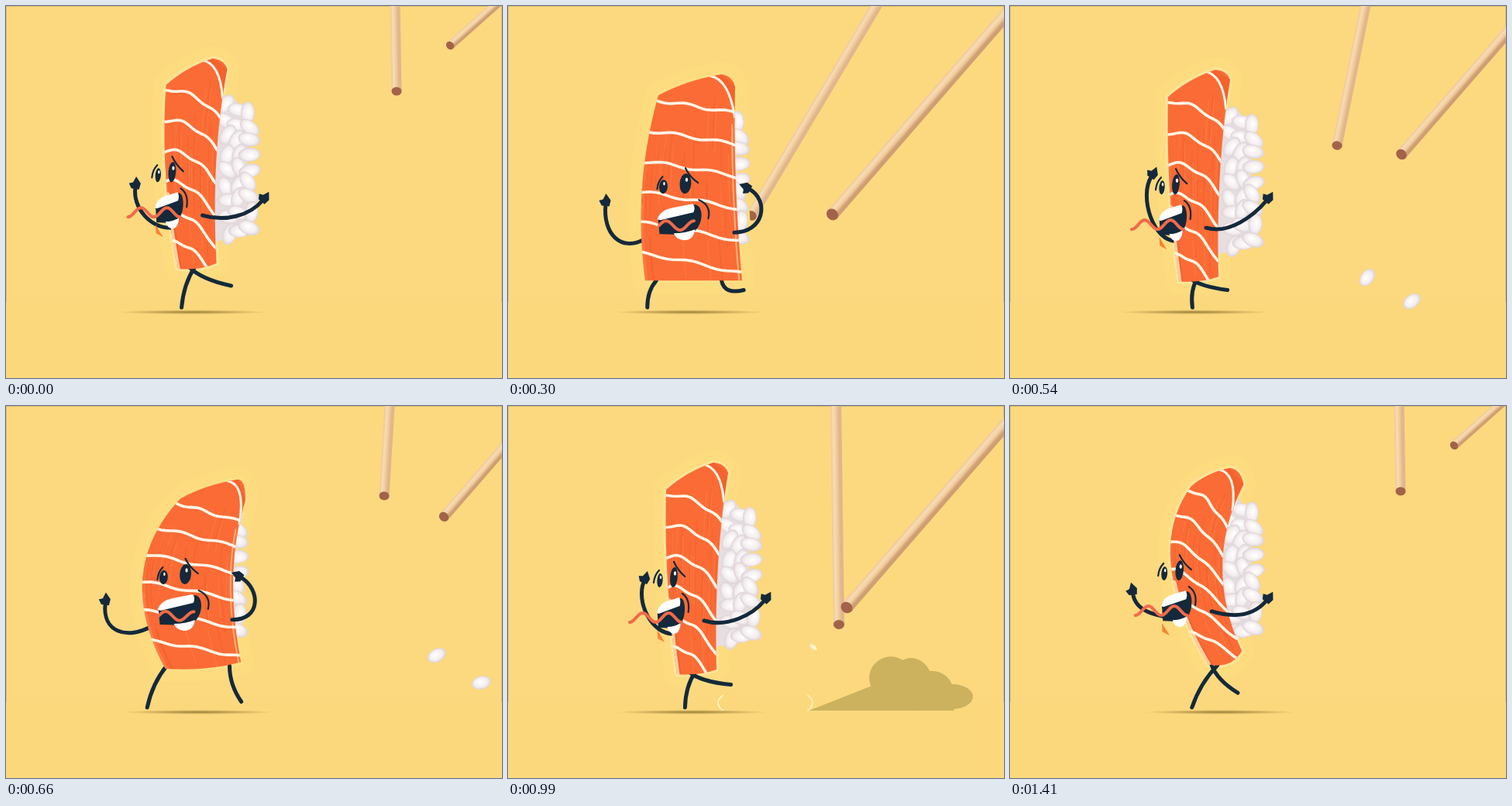
An HTML page with a canvas that plays this animation: 640 px wide and 480 px high, repeating every 1440 ms.

```html
<!DOCTYPE html>
<html lang="en">
<head>
<meta charset="utf-8">
<title>Runaway sushi</title>
<style>
  html, body { margin: 0; width: 100%; height: 100%; overflow: hidden; background: #fcd97e; }
  canvas { display: block; width: 640px; height: 480px; }
</style>
</head>
<body>
<canvas id="stage" width="640" height="480"></canvas>
<script>
const ctx = document.getElementById('stage').getContext('2d');
const LOOP = 1440, STEP = 30, STRIDE = 480, HITS = [840, 1200];
const NAVY = '#14293b', CREAM = '#fff6e6', SALMON = '#fa6b35', TAU = Math.PI * 2;

// Chopstick moments: back tip x, y, back tilt in degrees, front tip x, y.
const REST = [504,110,-1, 573,51], STAB = [340,385,12.9, 350,366];
const moments = [
  [0, ...REST], [180, 272,297,42, 392,298], [420, 356,244,19.6, 445,240], [660, 488,116,3.5, 565,143],
  [840, ...STAB], [990, 427,282,-.8, 437,260], [1220, ...STAB], [1410, ...REST], [LOOP, ...REST]
];

const mix = (a, b, k) => a + (b - a) * k;
const clamp = v => Math.max(0, Math.min(1, v));
const wave = (t, peak, period) => Math.cos(TAU * (t - peak) / period);
const noise = i => { const s = Math.sin(i * 91.7) * 4375.5; return s - Math.floor(s); };

// Eased values between neighbouring moments.
function sample(keys, t) {
  const i = keys.findIndex(key => key[0] > t), a = keys[i - 1], b = keys[i];
  const k = (t - a[0]) / (b[0] - a[0]);
  return a.slice(1).map((v, j) => mix(v, b[j + 1], k * k * (3 - 2 * k)));
}

// Parabola through three points at v = 0, .5 and 1.
function along([a, b, c], v) {
  const wa = (1 - v) * (1 - 2 * v), wb = 4 * v * (1 - v), wc = v * (2 * v - 1);
  return [0, 1].map(i => wa * a[i] + wb * b[i] + wc * c[i]);
}

function trace(f, steps = 20) {
  for (let i = 0; i <= steps; i++) ctx.lineTo(...f(i / steps));
}

function stroke(color, width) {
  ctx.strokeStyle = color;
  ctx.lineWidth = width;
  ctx.stroke();
}

function fill(color) {
  ctx.fillStyle = color;
  ctx.fill();
}

function polygon(list, color) {
  ctx.beginPath();
  for (let i = 0; i < list.length; i += 2) ctx.lineTo(list[i], list[i + 1]);
  ctx.closePath();
  fill(color);
}

function ellipse(x, y, rx, ry, color, turn = 0) {
  ctx.beginPath();
  ctx.ellipse(x, y, rx, ry, turn, 0, TAU);
  fill(color);
}

function local(x, y, turn, draw) {
  ctx.save();
  ctx.translate(x, y);
  ctx.rotate(turn);
  draw();
  ctx.restore();
}

function curve(x, y, ...rest) {
  ctx.beginPath();
  ctx.moveTo(x, y);
  rest.length > 4 ? ctx.bezierCurveTo(...rest) : ctx.quadraticCurveTo(...rest);
}

function shade(gradient, ...colors) {
  colors.forEach((c, i) => gradient.addColorStop(i / (colors.length - 1), c));
  return gradient;
}

// Every pose follows from how far the body is turned, bent and lifted.
function poseAt(t) {
  const phase = t % STRIDE;
  const side = clamp(.5 + .7 * wave(phase, 5, STRIDE));
  const bend = clamp(.5 + .95 * wave(phase, 162, 240));
  const lift = 4.6 - 12 * wave(phase, 225, 240);
  const blend = (base, turned = 0, bent = 0, both = 0) => base + turned * side + bent * bend + both * side * bend;
  const at = (x, y) => [blend(...x), blend(...y) + lift];
  const left = [
    at([194, 10, 30, 7], [106, 2, 14, -11]),
    at([173, 33, 2], [225, 3, -3, -18]),
    at([177, 41, 26, 21], [345, 1, -6, -2])
  ];
  const right = [
    at([293, -9, 16, 6], [95, -9, 27]),
    at([294, -23, 0, 4], [218, -11, 2, 6]),
    at([302, -33, 1, 37], [345, -5, -14, -8])
  ];
  const peak = at([275, -10, 25, -2], [79, -6, 16, 1]);
  return { phase, side, bend, lift, blend, at, left, right, peak };
}

function background() {
  ctx.fillStyle = '#fcd97e';
  ctx.fillRect(0, 0, 640, 480);
  ctx.fillStyle = 'rgba(240,200,100,.08)';
  ctx.fillRect(0, 382, 640, 98);
  ctx.fillStyle = '#dcbc70';
  ctx.fillRect(0, 0, 640, 1);
  ctx.fillRect(0, 0, 1, 382);
  ctx.fillRect(639, 0, 1, 382);
}

function groundShadow(x) {
  local(x, 395, 0, () => {
    ctx.scale(1, .03);
    ellipse(0, 0, 98, 98, shade(ctx.createRadialGradient(0, 0, 0, 0, 0, 98),
      'rgba(112,88,30,.7)', 'rgba(130,102,38,.4)', 'rgba(150,120,50,0)'));
  });
}

function impact(age) {
  if (age < 0 || age > 190) return;
  const grow = clamp((age - 30) / 120), dust = '#ccb25f';
  ctx.save();
  ctx.beginPath();
  ctx.rect(0, 0, 640, 393);
  ctx.clip();
  polygon([386, 394, 432 + 40 * grow, 370 - 10 * grow, 540 + 30 * grow, 372, 552 + 24 * grow, 394], dust);
  for (let i = 0; i < 4; i++) {
    ellipse(440 + 34 * i + grow * (54 - 8 * i), 381 - grow * (30 - 8 * i),
      25 + 3 * grow, 18 + 9 * Math.sin(i * 1.4 + .3) + 7 * grow, dust);
  }
  ctx.restore();
  const half = mix(1.05, .45, grow);
  for (const center of [0, Math.PI]) {
    ctx.beginPath();
    ctx.ellipse(332, 383, 61, 22, 0, center - half, center + half);
    stroke('#fff3bd', mix(3.5, 1.8, grow));
  }
  ellipse(mix(399, 394, grow), mix(346, 311, grow), 2.5, 5.5, '#fff6d2', mix(.6, -.9, grow));
}

function stick(x, y, tilt, w, length, dark) {
  local(x, y, tilt * Math.PI / 180, () => {
    const wood = shade(ctx.createLinearGradient(-w / 2, 0, w / 2, 0), '#eec89a', '#f8dcb2', '#f0cc9e', dark, dark);
    polygon([-w / 2, 0, -w / 2, -length + 4, 0, -length - 3, w / 2, -length + 5, w / 2, 0], wood);
    ellipse(0, 0, w / 2, w * .43, '#a2634a');
  });
}

function chopsticks(t) {
  const [bx, by, tilt, fx, fy] = sample(moments, t);
  stick(bx, by, tilt, 13 + 4 * (by / 385) ** 4, 381, '#e0b78c');
  stick(fx, fy, 41 + Math.max(0, 100 - fy) * .15, 10 + fy * .023, 520, '#cf9f73');
}

function grain(x, y, turn, rx, ry) {
  local(x, y, turn, () => {
    ctx.scale(rx, ry);
    ellipse(0, 0, 1, 1, shade(ctx.createRadialGradient(-.15, -.2, .1, 0, 0, 1), '#fffdfd', '#f9f5f5', '#f3edef', '#dcd2d6'));
  });
}

// A loose grain drifts right while its bounces die down.
function flyingGrain(age, height, rate) {
  if (age < 0) return;
  const size = clamp((age - 60) / 80);
  const y = 385 - height * Math.exp(-age / 270) * Math.abs(Math.cos(age * rate));
  grain(310 + .79 * age, y, (.21 * age - 95) * Math.PI / 180, 12.5 * size, 8.5 * size);
}

function rice({ side, lift }) {
  local(-16 * (1 - side), 4 + 4 * side + lift, 0, () => {
    polygon([268, 112, 296, 120, 312, 140, 310, 275, 292, 298, 264, 304], '#e6dee1');
    for (let i = 0; i < 27; i++) {
      const row = Math.floor(i / 3), col = i % 3;
      grain(283 + 14 * col + 4 * noise(i) + (row > 6 ? 2 : 0), 122 + 21 * row + 5 * col * (1 - row / 4) + 6 * noise(i + 9),
        noise(i + 40) * Math.PI, 14.5, 9);
    }
  });
}

function arm(x, y, c1x, c1y, c2x, c2y, hx, hy) {
  curve(x, y, c1x, c1y, c2x, c2y, hx, hy);
  stroke(NAVY, 5);
  local(hx, hy, Math.atan2(hy - c2y, hx - c2x), () => polygon([-2, -5, 4, -9, 6, -4, 14, -1, 6, 6, -2, 5], NAVY));
}

function leftArm({ phase, side, left }) {
  const [x, y] = along(left, .77), swing = Math.sin(TAU * phase / STRIDE);
  const hx = mix(126, 167 + 22 * swing, side), hy = mix(256, 234 - 20 * swing, side);
  arm(x + 4, y + 2, x - 26, y + 19 - 15 * side, hx - 18 * swing * side - 4, hy + 38 - 12 * side, hx, hy);
}

function rightArm({ side, blend, at }) {
  const [x, y] = at([292, -39, 1, 8], [283, -6, -7]);
  const hx = blend(311, 20, -9, 9), hy = blend(236, 15, -16, 16);
  arm(x, y, x + 38 - 8 * side, y + 9 * side, hx + 27 - 43 * side, hy + 15 + 4 * side, hx, hy);
}

// Both legs follow one rule, half a stride apart.
function leg({ phase, side, bend, left, right, blend }, sign) {
  const shift = sign > 0 ? 0 : STRIDE / 2, raise = Math.max(0, wave(phase + shift, 260, STRIDE)) ** 2;
  const hx = (left[2][0] + right[2][0]) / 2 - 6 - 9 * side * bend + sign * (42 - 38 * side);
  const hy = (left[2][1] + right[2][1]) / 2 + 12 * side * bend;
  const fx = blend(242, 16, 0, 8) - sign * wave(phase, 0, STRIDE) * (88 - 56 * side), fy = 389 - 30 * raise;
  curve(hx, hy, (hx + fx) / 2 - 6 - 6 * raise, (hy + fy) / 2 - 4 + 22 * raise * (1 - .6 * side), fx, fy);
  stroke(NAVY, 5);
}

function outline({ left, right, peak }) {
  const [bl, br] = [left[2], right[2]], sag = Math.max(0, bl[1] - br[1]);
  ctx.beginPath();
  trace(v => along(left, v));
  ctx.quadraticCurveTo((bl[0] + br[0]) / 2 + sag * .5, (bl[1] + br[1]) / 2 + sag * .9, ...br);
  trace(v => along(right, 1 - v));
  ctx.quadraticCurveTo((peak[0] + right[0][0]) / 2 + 5, peak[1] + 1, ...peak);
  ctx.quadraticCurveTo(mix(peak[0], left[0][0], .5) - 4, mix(peak[1], left[0][1], .5) - 6, ...left[0]);
  ctx.closePath();
}

function fish(pose) {
  const { left, right, peak, side } = pose;
  const inside = (u, v) => {
    const a = along(left, v), b = along(right, v);
    return [mix(a[0], b[0], u), mix(a[1], b[1], u)];
  };
  outline(pose);
  fill(SALMON);
  ctx.save();
  ctx.clip();
  for (let i = 0; i < 34; i++) {
    const u = noise(i), from = noise(i + 50) * .8;
    ctx.beginPath();
    trace(k => inside(u, from + k * .25), 5);
    stroke(i % 2 ? 'rgba(214,70,24,.16)' : 'rgba(255,160,100,.2)', 1.5);
  }
  ctx.beginPath();
  trace(v => along(left, .6 + v * .4));
  stroke(`rgba(255,236,190,${.1 + .7 * side})`, 7);

  const ridge = [peak[0] - 14, peak[1] + 2, peak[0] + 10, peak[1] + 6, ...along(right, .16)];
  curve(...ridge);
  ctx.lineTo(...right[0]);
  ctx.lineTo(...peak);
  fill('rgba(222,74,26,.25)');
  curve(...ridge);
  stroke(CREAM, 3);
  ctx.beginPath();
  trace(v => inside(.97, .2 + v * .8));
  stroke(`rgba(255,226,170,${.6 * (1 - side)})`, 2);

  for (let i = 0; i < 6; i++) {
    const start = .03 + .165 * i, drop = mix(.11, .24, side), power = mix(1.1, 1.6, side);
    ctx.beginPath();
    trace(u => inside(u, start + drop * u ** power + .008 * Math.sin(u * 12 + i)));
    stroke(CREAM, 3.6);
  }
  ctx.restore();
}

function mouth(k, side) {
  ctx.save();
  ctx.scale(k, 1);
  if (side > .5) polygon([-27, 20, -26, 31, -12, 36], '#fb8134');
  curve(-27, -4, 0, -13, 20, -21);
  ctx.bezierCurveTo(32, -20, 32, 10, 12, 18);
  ctx.lineTo(-25, 17);
  fill(NAVY);
  curve(-28, -2, -24, -14, -8, -17);
  ctx.lineTo(17, -22);
  ctx.quadraticCurveTo(21, -17, 18, -11);
  ctx.lineTo(-24, -1);
  fill('#fff');
  curve(-7, 16, 8, 16, 20, 11);
  ctx.quadraticCurveTo(18, 25, 6, 25);
  ctx.quadraticCurveTo(-4, 24, -7, 16);
  fill('#fff');
  ctx.restore();
  ctx.beginPath();
  trace(u => [
    mix(mix(-26, -53, side), mix(19, 14, side), u),
    mix(6 - 6 * Math.sin(2.5 * Math.PI * u), 4 + 6 * Math.cos(2 * TAU * u), side)
  ], 30);
  stroke('#f2694a', 4);
}

function face({ side, bend, at }) {
  const [x, y] = at([229, -15, 3, 3], [220, 1, -3]);
  const gap = 28.5 - 10.5 * side + 2 * side * bend, k = gap / 28, lx = x - gap, ly = y + 4;
  curve(lx - 8, ly + 3, lx - 7, ly - 7, lx - 1, ly - 13);
  stroke(NAVY, 2.2);
  curve(x, y - 20, x + 5, y - 9, x + 16 * k + 4 * side, y - 1);
  stroke(NAVY, 2.2);
  ellipse(lx, ly, 5 * k + .4, 9, NAVY, .08);
  ellipse(x, y, 7 * k + .3, 13, NAVY, .08);
  ellipse(lx + 1, ly - 4, 1.2, 2.2, '#fff');
  ellipse(x + 1.5, y - 5, 1.6, 2.8, '#fff');
  curve(x + 17 * k, y + 21, x + 33 * k, y + 28, x + 29 * k, y + 45);
  stroke(NAVY, 2.2);
  local(x - 8 + 4 * side, y + 48, 0, () => mouth(k, side));
}

function draw(t) {
  const pose = poseAt(t);
  ctx.lineCap = ctx.lineJoin = 'round';
  background();
  HITS.forEach(hit => impact(t - hit));
  groundShadow((pose.left[2][0] + pose.right[2][0]) / 2 - 6);
  chopsticks(t);
  flyingGrain(t - 276, 160, .0062);
  flyingGrain(t - 349, 200, .0101);
  outline(pose);
  stroke('#fddc7f', 32);
  outline(pose);
  stroke(`rgba(255,240,180,${.1 + .4 * pose.side})`, 6);
  leg(pose, 1);
  leg(pose, -1);
  leftArm(pose);
  rice(pose);
  fish(pose);
  face(pose);
  rightArm(pose);
}

function tick() {
  draw(Math.floor(performance.now() / STEP) * STEP % LOOP);
  requestAnimationFrame(tick);
}
tick();
</script>
</body>
</html>
```
